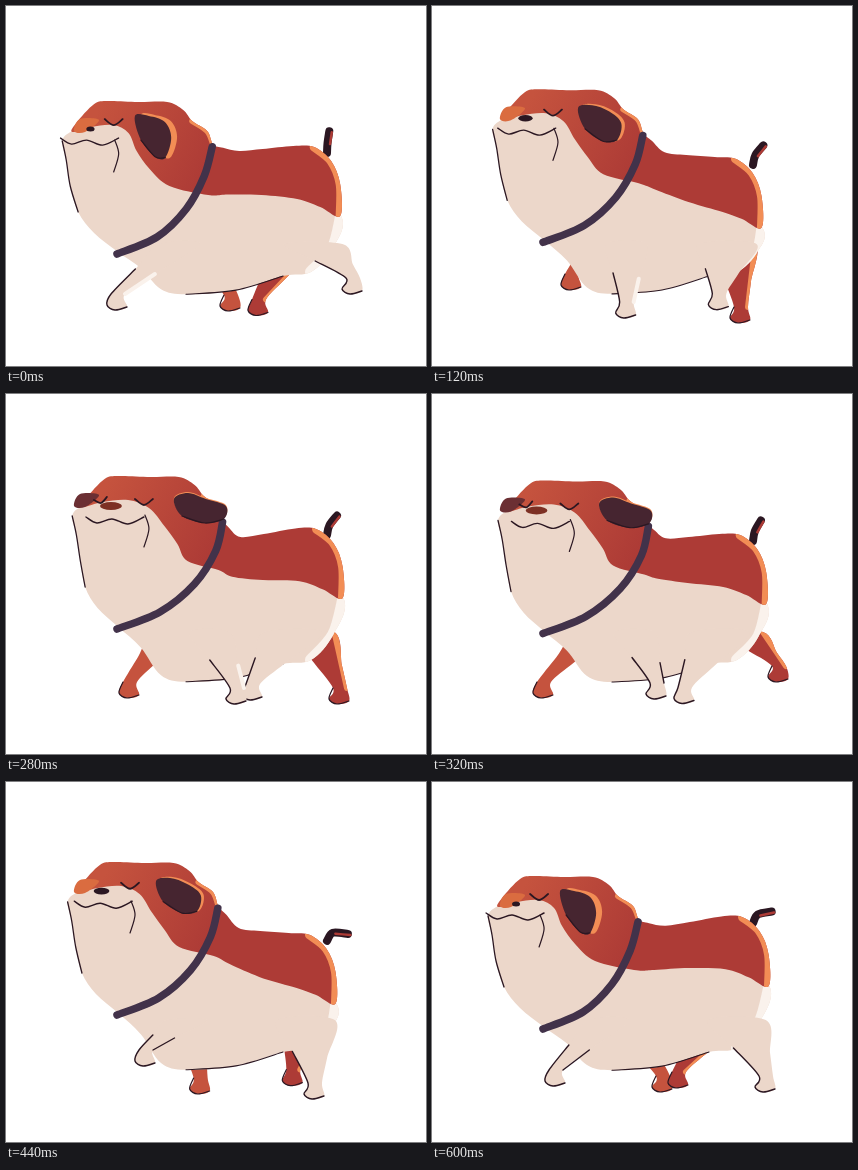
Write an HTML page with a canvas that moves like this. It is 420 by 360 pixels and loops after 640 ms.

```html
<!DOCTYPE html>
<html lang="en">
<head>
<meta charset="utf-8">
<title>Walking dog</title>
<style>
html, body { margin: 0; width: 100%; height: 100%; overflow: hidden; background: #fff; }
canvas { display: block; }
</style>
</head>
<body>
<canvas id="stage" width="420" height="360"></canvas>
<script>
const ctx = document.getElementById('stage').getContext('2d');
const INK = '#2b1722', CREAM = '#ecd7ca', LIGHT = '#faf2ec', ORANGE = '#f28d55';
const RED = '#ad3b36', WARM = '#c5533e', DARK = '#462530', MAROON = '#6b2f33';

const LOOP = 640, TAU = 2 * Math.PI;
const STEPS = [0, 40, 80, 120, 200, 280, 320, 360, 400, 440, 520, 600];
const KEYS = [0, 80, 200, 280, 360, 440, 600, LOOP];

const pts = text => text.split(' ').map(p => p.split(',').map(Number));
const clamp = v => Math.max(0, Math.min(1, v));
const lerp = (a, b, k) => a + (b - a) * k;
const mix = (a, b, k) => a.map((v, i) => lerp(v, b[i], k));

// Outlines at rest with the head in profile.
const COAT = pts('66,118 70,109 88,90 102,87 132,88 161,88 177,96 186,107 201,117 207,131 217,137 233,144 256,142 286,138 307,139 324,153 333,176 333,208 313,199 290,191 255,188 222,185 202,181 163,172 143,155 130,137 122,119 107,111 85,113');
const BODY = pts('66,117 56,127 60,146 64,172 72,198 88,219 112,238 135,257 155,282 180,288 230,284 277,270 305,266 326,242 334,208 290,170 200,150 150,110 95,104');
const COLLAR = pts('206,133 198,162 180,195 151,223 111,240');
const EAR_SIDE = pts('128,102 142,102 158,108 164,124 158,144 148,143 134,126');
const EAR_FRONT = pts('168,110 182,104 200,110 220,117 218,130 199,134 176,127');
const MUZZLE = pts('68,117 74,105 93,106 79,118');
const EYE = pts('98,105 107,111 116,105');
const FAR_EYE = pts('57,106 64,109 70,103');
const MOUTH = pts('54,124 65,130 80,126 96,131 112,124');
const CHEEK = pts('108,126 112,140 107,158');

// Tracks: one value per key time.
const FRONT_PAW = pts('110,300 183,309 212,306 229,306 217,296 138,280 122,300');
const HIND_PAW = pts('345,284 303,301 250,297 245,302 257,309 307,313 332,306');
const HEAD_BOB = [[8], [-2], [-7], [-5], [4], [-7], [7]];
const TAIL_TILT = [[6], [12], [60], [27], [15], [72], [58]];

function track(values, time) {
  const t = time % LOOP;
  const i = KEYS.findLastIndex(k => k <= t);
  return mix(values[i], values[(i + 1) % values.length], (t - KEYS[i]) / (KEYS[i + 1] - KEYS[i]));
}

function trace(points, closed) {
  const n = points.length;
  const at = i => points[closed ? (i + n) % n : Math.max(0, Math.min(n - 1, i))];
  ctx.beginPath();
  ctx.moveTo(...points[0]);
  for (let i = 0; i < (closed ? n : n - 1); i++) {
    const [p, q, r, s] = [at(i - 1), at(i), at(i + 1), at(i + 2)];
    ctx.bezierCurveTo(
      q[0] + (r[0] - p[0]) / 6, q[1] + (r[1] - p[1]) / 6,
      r[0] - (s[0] - q[0]) / 6, r[1] - (s[1] - q[1]) / 6, r[0], r[1]);
  }
}

function fill(points, color) {
  trace(points, true);
  ctx.fillStyle = color;
  ctx.fill();
}

function line(points, width = 1.4, color = INK) {
  trace(points, false);
  ctx.lineWidth = width;
  ctx.strokeStyle = color;
  ctx.stroke();
}

// Stroke that stays inside the given shape.
function edge(shape, from, to, width, color) {
  ctx.save();
  trace(shape, true);
  ctx.clip();
  line(shape.slice(from, to), width, color);
  ctx.restore();
}

// Leg outline from the front of the hip round the paw to the back of the hip.
function leg([x, y], hipX, sway, width) {
  const hip = hipX + sway * (x - hipX);
  const front = [hip - width, 238], back = [hip + width, 238];
  const shin = [x - 5, y - 12], heel = [x + 9, y - 12];
  return [front, mix(front, shin, 0.5), shin, [x - 9, y - 1], [x - 1, y + 4],
    [x + 11, y + 1], heel, mix(back, heel, 0.6), back];
}

const fur = ctx.createLinearGradient(100, 90, 210, 150);
fur.addColorStop(0, WARM);
fur.addColorStop(1, RED);

function draw(t) {
  const turn = Math.sin(Math.PI * (t + 30) / LOOP) ** 2;
  const rump = 5 + 10 * Math.cos(2 * TAU * (t - 95) / LOOP);
  const [bob] = track(HEAD_BOB, t);
  const facing = turn > 0.6;

  // The head end bobs and turns, the rump end rises and falls, the belly stays.
  const warp = ([x, y]) => {
    const head = clamp((235 - x) / 30);
    const rear = clamp((x - 220) / 70) * clamp((260 - y) / 50);
    const bulge = Math.exp(-((x - 138) ** 2 + (y - 145) ** 2) / 1570);
    return [
      x + turn * head * clamp((240 - y) / 60) * (10 + 20 * bulge) - 0.4 * rear * (rump - 5),
      y + bob * head * clamp((290 - y) / 50) + rump * rear
    ];
  };
  const face = (points, dx, dy = 0) => points.map(([x, y]) => [x + dx * turn, y + dy * turn + bob]);

  const coat = COAT.map(warp), body = BODY.map(warp);
  const nearFront = leg(track(FRONT_PAW, t), 195, 0.25, 20);
  const nearHind = leg(track(HIND_PAW, t), 298, 0.2, 29);
  const farFront = leg(track(FRONT_PAW, t + LOOP / 2), 178, 0.25, 17);
  const farHind = leg(track(HIND_PAW, t + LOOP / 2), 300, 0.2, 22);

  ctx.clearRect(0, 0, 420, 360);
  ctx.lineJoin = ctx.lineCap = 'round';

  const tilt = track(TAIL_TILT, t)[0] * TAU / 360;
  const tail = [0, 10, 22].map((d, i) =>
    [321 + d * Math.sin(tilt * i / 2), 145 + rump - d * Math.cos(tilt * i / 2)]);
  line(tail, 8, INK);
  line(tail.slice(1).map(([x, y]) => [x + 2.5, y + 1]), 2.5, RED);

  fill(farFront, WARM);
  fill(farHind, RED);
  edge(farHind, 6, 9, 6, ORANGE);
  for (const far of [farFront, farHind]) line(far.slice(2, 6), 1.2);

  fill(body, CREAM);
  edge(body, 12, 15, 12, LIGHT);
  line(body.slice(1, 5), 1.3);
  line(body.slice(9, 12), 1.1);
  for (const near of [nearHind, nearFront]) {
    fill(near, CREAM);
    line(near.slice(1, 6));
  }
  const lit = t < LOOP / 2;
  line(nearFront.slice(6, 8), lit ? 4 : 1.4, lit ? LIGHT : INK);

  fill(coat, fur);
  edge(coat, 14, 18, 9, ORANGE);
  edge(coat, 7, 10, 6, ORANGE);
  line(COLLAR.map(warp), 7.5, '#42324a');

  const ear = face(EAR_SIDE.map((p, i) => mix(p, EAR_FRONT[i], turn)), 0);
  fill(ear.map(([x, y]) => [x + 6 * (1 - turn), y - 1]), ORANGE);
  fill(ear, DARK);
  line(ear.slice(4), 1.2);

  fill(face(MUZZLE, 0), facing ? MAROON : '#da6c40');
  ctx.beginPath();
  ctx.ellipse(lerp(84, 105, turn), lerp(115, 117, turn) + bob, lerp(4, 11, turn), lerp(2.5, 4, turn), 0, 0, TAU);
  ctx.fillStyle = facing ? '#7d3024' : INK;
  ctx.fill();
  line(face(EYE, 31, 5), 1.8);
  if (facing) line(face(FAR_EYE, 31, 5), 1.8);
  line(face(MOUTH, 26, 4));
  line(face(CHEEK, 31), 1.2);
}

const start = performance.now();
let shown;
function tick() {
  const t = (performance.now() - start) % LOOP;
  const step = STEPS.findLast(s => s <= t);
  if (step !== shown) draw(shown = step);
  requestAnimationFrame(tick);
}
tick();
</script>
</body>
</html>
```
